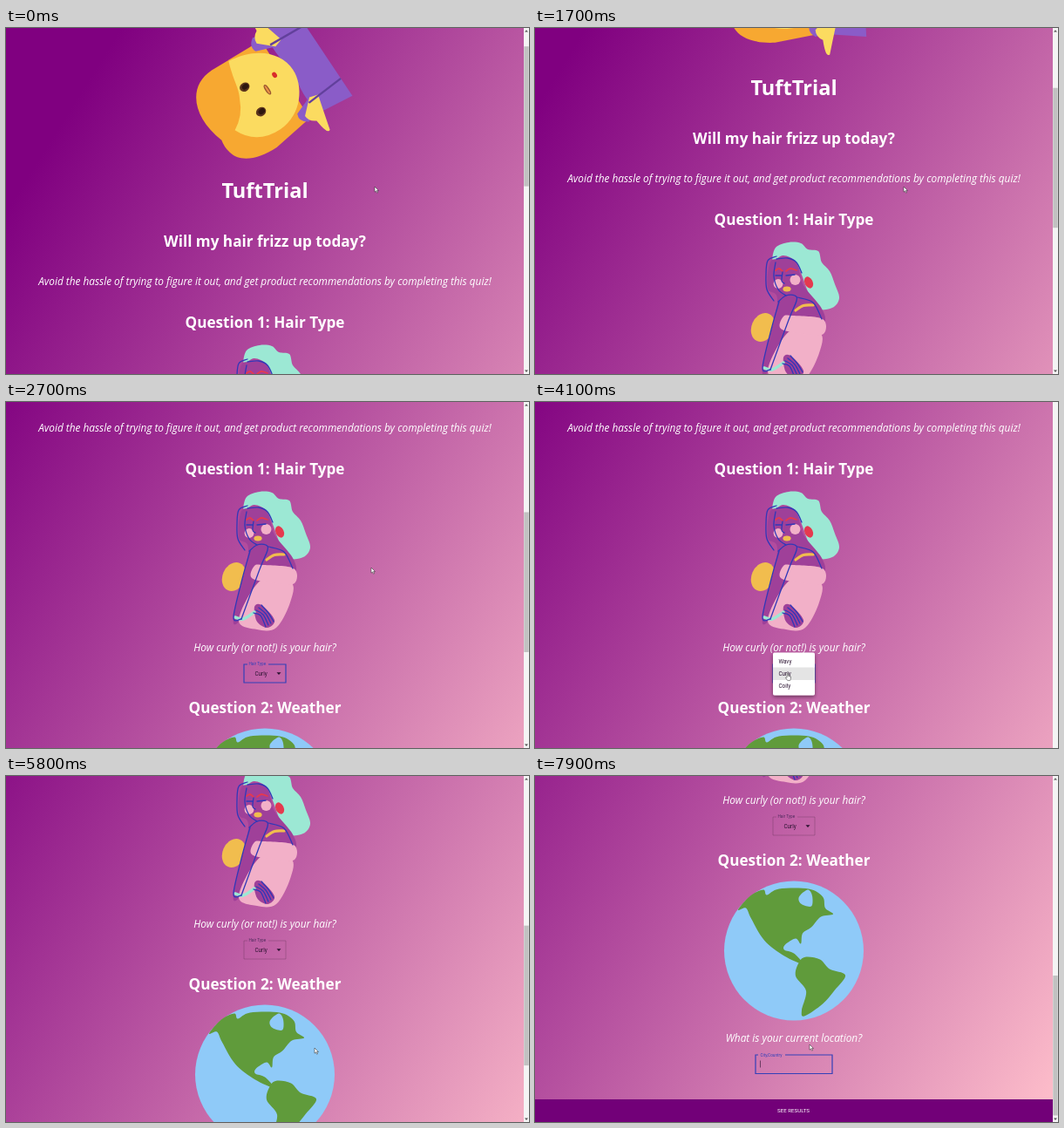
These frames come from a looping animation (600x397 px, 8000 ms). An HTML page:

```html
<!DOCTYPE html>
<html lang="en">
<head>
<meta charset="utf-8">
<title>Hair quiz</title>
<style>
  html, body { margin: 0; width: 100%; height: 100%; overflow: hidden; background: #fff; }
  svg { display: block; }
  text { font-family: "Open Sans", "Noto Sans", sans-serif; fill: #fff; }
  .mid { text-anchor: middle; }
  .head { font-size: 17.15px; font-weight: 700; }
  .note { font-size: 11.86px; font-style: italic; }
  .ui text, text.ui { font-family: Roboto, Arial, sans-serif; }
  .ui .label { font-size: 4.7px; fill: #4d2a5c; }
  .ui .value { font-size: 6.3px; fill: #2a1230; }
  .ui .frame { fill: none; stroke: #000; stroke-opacity: .25; stroke-width: .7; }
  .focus .frame { stroke: #3340b8; stroke-opacity: 1; stroke-width: 1.2; }
  .focus .label { fill: #3340b8; }
</style>
</head>
<body>
<svg width="600" height="397" viewBox="0 0 600 397">
  <defs>
    <linearGradient id="sky" x1="0" y1="0" x2="1" y2="1">
      <stop offset=".13" stop-color="#800080"/>
      <stop offset="1" stop-color="#ffc0cb"/>
    </linearGradient>
    <filter id="shade" x="-30%" y="-30%" width="160%" height="170%">
      <feDropShadow dx="0" dy="2" stdDeviation="2" flood-opacity=".45"/>
    </filter>
  </defs>

  <g id="page">
    <rect width="594" height="947" fill="url(#sky)"/>

    <g id="girl">
      <path fill="#f7a831" d="M-55 25L-62-25C-62-52-52-70-37-73Q-28-75-20-73C20-86 53-72 53-38L50 28Z"/>
      <path fill="#8a5cc8" d="M-61 80L-56 38Q-30 30 0 40 30 30 56 38L61 80Z"/>
      <g id="arm">
        <path fill="#8a5cc8" d="M-34 40L-43 16Q-52 12-58 22L-52 34Z"/>
        <path fill="#fbdb60" d="M-35 38L-38 48Q-56 43-79 37-83 32-62 30-58 22-50 22Z"/>
        <path stroke="#62409c" stroke-width="2.4" d="M-40 34L-37 80"/>
      </g>
      <use href="#arm" transform="scale(-1 1)"/>
      <path fill="#fbdb60" d="M51-16C30-24 18-23 7-30Q-10-37-19-54-47-42-47-10C-47 20-20 40 2 40 25 40 47 20 51-16Z"/>
      <g id="eye">
        <ellipse cx="-18" cy="-17.3" rx="5" ry="6" fill="#5b341d"/>
        <ellipse cx="-18" cy="-16.5" rx="3" ry="4" fill="#2e1710"/>
      </g>
      <use href="#eye" x="34"/>
      <ellipse cx="-1" cy="2.8" rx="6" ry="1.8" fill="#e99146" stroke="#98552f" stroke-width="1.3"/>
      <ellipse cx="8.5" cy="19" rx="3.4" ry="2.6" fill="#d92b2b"/>
    </g>

    <text class="mid" x="297" y="229.5" font-size="23.6" font-weight="700">TuftTrial</text>
    <text class="mid head" x="297" y="285.5">Will my hair frizz up today?</text>
    <text class="mid note" x="297" y="329.5">Avoid the hassle of trying to figure it out, and get product recommendations by completing this quiz!</text>
    <text class="mid head" x="297" y="378.5">Question 1: Hair Type</text>
    <g id="lady" transform="translate(0 296)"></g>
    <text class="mid note" x="297" y="581.5">How curly (or not!) is your hair?</text>

    <g id="select" class="ui">
      <path class="frame" d="M277 597H273V618H321V597H301"/>
      <text class="label" x="278.5" y="598.3">Hair Type</text>
      <text class="value" x="285.5" y="609.7">Curly</text>
      <path d="M310.5 606.3h5l-2.5 2.6z" fill="#2a1230"/>
    </g>

    <text class="mid head" x="297" y="652.8">Question 2: Weather</text>
    <g id="earth" transform="translate(297 750.5)"></g>
    <text class="mid note" x="297" y="855">What is your current location?</text>

    <g id="city" class="ui">
      <path id="cityFrame" class="frame"/>
      <text id="cityLabel" class="label">City,Country</text>
      <path id="caret" d="M258.5 876.5v8" stroke="#2a1230" stroke-width=".6"/>
    </g>

    <rect y="921" width="594" height="26" fill="#720078"/>
    <text class="mid ui" x="296.5" y="936.2" font-size="6.2">SEE RESULTS</text>

    <g id="menu" class="ui">
      <rect x="273" y="583.5" width="48" height="49" rx="1.8" fill="#fff" filter="url(#shade)"/>
      <rect x="273" y="600.5" width="48" height="14.5" fill="#e4e4e4"/>
      <text class="value" x="279.5" y="595.5">Wavy</text>
      <text class="value" x="279.5" y="610">Curly</text>
      <text class="value" x="279.5" y="624.3">Coily</text>
    </g>
  </g>

  <rect x="594" width="6" height="397" fill="#f4f4f4"/>
  <g id="bar">
    <rect id="thumb" x="594.3" width="5.4" height="160.5" fill="#c1c1c1"/>
    <path d="M595 4.6h4l-2-2.4zM595 392.6h4l-2 2.4z" fill="#555"/>
  </g>

  <g id="mouse" fill="#fff" stroke="#222" stroke-width=".5">
    <path id="arrow" d="M0 0V6.2L1.5 4.9 2.6 7.2 3.6 6.7 2.5 4.5H4.5Z"/>
    <path id="hand" d="M1.2 .5Q2 0 2.4 .8V3.2L5.4 4V6.8L4.6 8.6H1.8L-.6 5.4Q-.3 4.4 1.1 5.2Z"/>
  </g>
</svg>

<script>
const $ = id => document.getElementById(id);
const set = (node, attrs) => { for (const k in attrs) node.setAttribute(k, attrs[k]); return node; };
const show = (id, on) => { $(id).style.display = on ? "" : "none"; };
const add = (parent, tag, attrs) =>
  $(parent).appendChild(set(document.createElementNS("http://www.w3.org/2000/svg", tag), attrs));

// Smooth path through "x,y x,y ..." points.
function curve(points, closed) {
  const p = points.split(" ").map(s => s.split(",").map(Number)), n = p.length;
  const at = i => closed ? p[(i + n) % n] : p[Math.max(0, Math.min(n - 1, i))];
  const lean = (q, from, to) => q.map((v, j) => v + (to[j] - from[j]) / 6);
  let d = "M" + p[0];
  for (let i = 0; i < (closed ? n : n - 1); i++) {
    const a = at(i - 1), b = at(i), c = at(i + 1), e = at(i + 2);
    d += `C${lean(b, a, c)} ${lean(c, e, b)} ${c}`;
  }
  return d;
}
const blob = (to, fill, points) => add(to, "path", { d: curve(points, true), fill });
const line = (to, stroke, width, points) =>
  add(to, "path", { d: curve(points), fill: "none", stroke, "stroke-width": width, "stroke-linecap": "round" });
const oval = (to, fill, cx, cy, rx, ry = rx) => add(to, "ellipse", { cx, cy, rx, ry, fill });

function drawLady() {
  const l = "lady", ink = "#3038b8", mint = "#9ce8d4", skin = "#9f4099", pink = "#f2b0c8", gold = "#f1bd4e", red = "#e5394f";
  blob(l, mint, "273,124 276,109 291,103 305,104 313,111 325,113 329,126 338,136 344,151 349,167 341,178 322,179 314,162 300,127 285,118");
  oval(l, gold, 0, 0, 13, 17).setAttribute("transform", "translate(261.5 200.5) rotate(24)");
  blob(l, skin, "278,122 299,125 308,152 329,179 331,196 305,198 270,249 261,246 278,171 267,156 269,128");
  blob(l, pink, "292,205 327,207 326,230 310,259 288,261 267,250");
  blob(l, pink, "285,188 296,187 330,191 331,208 308,208 282,202");
  line(l, gold, 3.2, "299,181 308,175.5 319,175");
  blob(l, skin, "285,235 293,233 308,250 300,259 288,252");
  line(l, mint, 3.4, "263,247 272,249 285,241");
  oval(l, pink, 279, 150.5, 5.4);
  oval(l, pink, 298.5, 146, 6);
  oval(l, red, 314, 149, 4.6, 7).setAttribute("transform", "rotate(-25 314 149)");
  oval(l, gold, 289, 156.5, 4.6, 3);
  line(l, red, 1.8, "276,135 280,133 284,136");
  line(l, red, 1.8, "288,136 293,133 300,135");
  [
    "277,119 267,124 265,140 266,157 274,170",
    "277,122 290,121 300,126 306,138",
    "276,126 274,142 279,157 288,164",
    "284,137 283,147 286,150",
    "276,141 283,141", "288,141 298,140",
    "279,171 288,164 298,164 300,170 291,192 270,249",
    "280,171 271,203 261,247 270,249",
    "301,166 319,172 329,191"
  ].forEach(s => line(l, ink, 1.3, s));
  for (let i = 0; i < 4; i++)
    line(l, ink, 1.3, `${284 + i * 3},${242 - i * 3} ${292 + i * 3},${245 - i} ${298 + i * 3},${258 - i * 2}`);
}

function drawEarth() {
  const e = "earth", land = "#609b3b", sea = "#8fcaf8";
  oval(e, sea, 0, 0, 80);
  blob(e, land, "-64,-47 -50,-63 -35,-70 -31,-64 -17,-71 17,-71 33,-62 36,-49 45,-42 31,-39 20,-27 10,-20 8,-8 2,-14 -10,-7 -11,-1 0,3 10,15 -11,6 -34,-12 -49,-37 -55,-49");
  blob(e, sea, "6,-62 16,-70 21,-63 20,-51 8,-54");
  blob(e, land, "6,13 14,7 30,10 41,21 59,28 47,45 33,61 12,75 9,68 14,46 2,29");
}

const ramp = (t, from, to) => Math.max(0, Math.min(1, (t - from) / (to - from)));

// Adds up straight moves, each [from, to, dx or dy ...].
const travel = (home, moves, t) =>
  home.map((v, i) => moves.reduce((sum, m) => sum + m[i + 2] * ramp(t, m[0], m[1]), v));

const scroll = [[0, 1000, 59], [1000, 1700, 59], [1700, 2600, 143], [5400, 5800, 112], [5800, 6600, 73], [6700, 7300, 69]];
const pointer = [[2400, 2700, -4, 8], [2700, 3800, -131, 121], [4500, 5100, 66, 1], [6800, 7600, -45, 16], [7700, 7900, 6, -20]];

function cityField(on) {
  $("city").classList.toggle("focus", on);
  set($("cityFrame"), { d: `M256 870H253V891.5H341V870H${on ? 287 : 256}` });
  set($("cityLabel"), on ? { x: 258.5, y: 871.5 } : { x: 261, y: 883 });
  $("cityLabel").style.fontSize = on ? "4.7px" : "6.3px";
  show("caret", on);
}

function render(t) {
  const [y] = travel([35], scroll, t), [mx, my] = travel([423, 182], pointer, t);
  const onSelect = t >= 3200 && t < 4700;
  set($("page"), { transform: `translate(0 ${-y})` });
  set($("girl"), { transform: `translate(297 106.5) rotate(${t * .018 - 123.7})` });
  set($("thumb"), { y: 7 + y / 2.478 });
  set($("mouse"), { transform: `translate(${mx} ${my})` });
  $("menu").style.opacity = ramp(t, 3400, 3600) - ramp(t, 4300, 4500);
  show("bar", t < 3400 || t >= 4500);
  show("arrow", !onSelect);
  show("hand", onSelect);
  $("select").classList.toggle("focus", t < 5000);
  cityField(t >= 7700);
}

drawLady();
drawEarth();
const start = performance.now(), LOOP = 8000, STEP = 100;
function tick() {
  const t = (performance.now() - start) % LOOP;
  render(Math.floor(t / STEP) * STEP);
  requestAnimationFrame(tick);
}
tick();
</script>
</body>
</html>
```
